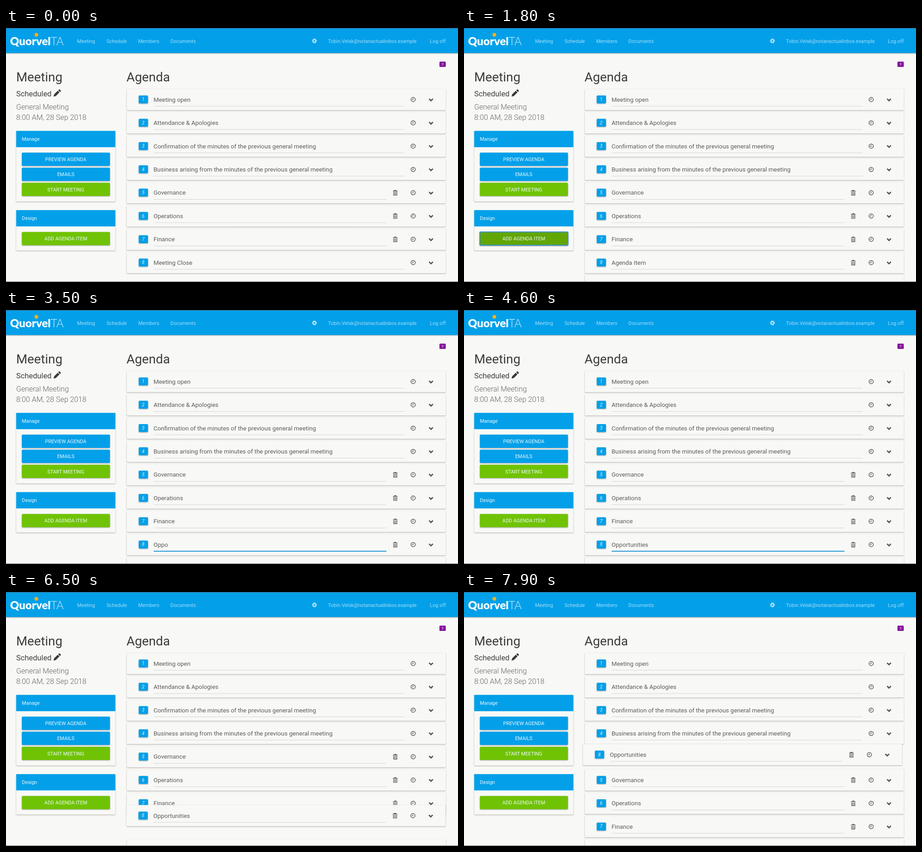
These frames come from a looping animation (998x561 px, 8000 ms). An HTML page:

```html
<!DOCTYPE html>
<html lang="en">
<head>
<meta charset="utf-8">
<title>Meeting agenda</title>
<style>
  html, body { margin: 0; width: 100%; height: 100%; overflow: hidden; background: #f8f9f6; }
  svg { display: block; width: 100%; height: 100%; font-family: Roboto, "Open Sans", sans-serif; }
  text { white-space: pre; }
  .nav { font-size: 11px; fill: #a5dcf6; }
  .logo { font-family: Lato, sans-serif; font-size: 24.5px; font-weight: 900; fill: #fff; }
  .thin { font-weight: 300; fill: #d8f1fc; }
  .title { font-size: 28.2px; fill: #3c3c3c; }
  .state { font-size: 16.8px; fill: #3f3f3f; }
  .meta { font-size: 16.3px; font-weight: 300; fill: #666; }
  .label { font-size: 10.9px; fill: #edf8fd; }
  .mid { text-anchor: middle; }
  .item { font-size: 13.45px; fill: #5c5c5c; }
  .num { font-size: 10px; font-style: italic; fill: #e4f5fd; text-anchor: middle; }
  .card { fill: #f8f9f6; filter: drop-shadow(0 1px 1px rgba(70, 50, 50, .42)); }
  .raised { filter: drop-shadow(0 1px 1px rgba(0, 0, 0, .38)); }
  .blue { fill: #03a0e9; }
  .green { fill: #70c304; }
  .line { stroke: #d3d4d2; stroke-width: 1; }
  .focus .line { stroke: #1f93d6; stroke-width: 2; }
  .icon { fill: #555; }
  .stroke { fill: none; stroke: #555; }
</style>
</head>
<body>
<svg id="stage" viewBox="0 0 998 561">
  <rect width="998" height="561" fill="#f8f9f6"/>
  <g id="rows"></g>
  <rect class="blue raised" width="998" height="55.3"/>
  <rect width="998" height="1.2" fill="#3f6c80"/>
  <rect y="559.8" width="998" height="1.2" fill="#707270"/>
  <circle cx="67" cy="15" r="4.2" fill="#f4b01c"/>
  <text class="logo" x="9" y="38">Quorvel<tspan class="thin">TA</tspan></text>
  <g class="nav">
    <text x="157" y="33">Meeting</text>
    <text x="222" y="33">Schedule</text>
    <text x="292" y="33">Members</text>
    <text x="363" y="33">Documents</text>
    <text x="711" y="33">Tobin.Velsk@notanactualinbox.example</text>
    <text x="936" y="33">Log off</text>
  </g>
  <g transform="translate(681 28.5)" fill="none" stroke="#b5e3f8">
    <circle r="3" stroke-width="2.4"/>
    <circle r="4.7" stroke-width="1.6" stroke-dasharray="1.85 1.84"/>
  </g>
  <rect x="957" y="74.3" width="14" height="11.7" rx="1.5" fill="#84189c"/>
  <text x="964" y="83" font-size="8" font-weight="700" fill="#ead5ef" class="mid">?</text>
  <text class="title" x="22.5" y="118.3">Meeting</text>
  <text class="title" x="266" y="118.3">Agenda</text>
  <text class="state" x="22.5" y="150.7">Scheduled</text>
  <path d="M105 151.500l1.300-5 8-8 3.700 3.700-8 8zM115.300 137.500l1.600-1.600q1-.8 2 0l1.900 1.900q.8 1 0 2l-1.600 1.600z" fill="#3a3a3a"/>
  <text class="meta" x="22.5" y="180">General Meeting</text>
  <text class="meta" x="22.5" y="202.500">8:00 AM, 28 Sep 2018</text>
  <g id="panels"></g>
</svg>
<script>
const LOOP = 8000, STEP = 100, PITCH = 51.45, FIRST = 158;
const HOVER = 600, ADD = 1500, LEAVE = 2000, FOCUS = 2900, TYPE = 3200, KEY = 90, BLUR = 5100;
const NEW_NAME = "Opportunities";
const $ = id => document.getElementById(id);

function add(parent, tag, attrs, text) {
  const node = document.createElementNS("http://www.w3.org/2000/svg", tag);
  for (const key in attrs) node.setAttribute(key, attrs[key]);
  if (text !== undefined) node.textContent = text;
  return parent.appendChild(node);
}

function box(parent, cls, x, y, width, height, rx = 0) {
  return add(parent, "rect", { class: cls, x, y, width, height, rx });
}

function panel(y, height, title) {
  box($("panels"), "card", 22.5, y, 219, height, 1);
  box($("panels"), "blue", 22.5, y, 219, 36, 1);
  add($("panels"), "text", { class: "label", x: 35, y: y + 22 }, title);
}

function button(y, cls, title) {
  const rect = box($("panels"), cls + " raised", 35, y, 194.5, 29.3, 2);
  add($("panels"), "text", { class: "label mid", x: 132, y: y + 18.7 }, title);
  return rect;
}

// Row parts are placed around the row's vertical centre.
function makeRow(name, removable) {
  const g = add($("rows"), "g", {});
  box(g, "card", 266.5, -23.5, 704.5, 47, 1);
  box(g, "blue raised", 293, -9, 20.500, 17.500, 2);
  const num = add(g, "text", { class: "num", x: 303, y: 3.3 });
  const label = add(g, "text", { class: "item", x: 325.7, y: 4.6 }, name);
  add(g, "line", { class: "line", x1: 326, x2: removable ? 840 : 880, y1: 14.700, y2: 14.700 });
  if (removable) {
    add(g, "path", { class: "icon", d: "M854.500-4.500h3v-1.500h4v1.500h3v1.400h-10z" });
    add(g, "path", { class: "stroke", d: "M855.800-2.500v8h7.400v-8M858.200-2v6.500M860.800-2v6.500", "stroke-width": 1.2 });
  }
  add(g, "circle", { class: "stroke", cx: 899, cy: 0, r: 4.700, "stroke-width": 1.5 });
  add(g, "path", { class: "stroke", d: "M899-3v3.500h-2.600", "stroke-width": 1.1 });
  add(g, "path", { class: "stroke", d: "M934.200-1.600l4.200 4.100 4.200-4.100", "stroke-width": 2.8 });
  return { g, num, label };
}

panel(227.2, 156, "Manage");
button(275.2, "blue", "PREVIEW AGENDA");
button(308.4, "blue", "EMAILS");
button(341.8, "green", "START MEETING");
panel(402.3, 89.200, "Design");
const addButton = button(450.5, "green", "ADD AGENDA ITEM");

const rows = [
  ["Meeting open"],
  ["Attendance & Apologies"],
  ["Confirmation of the minutes of the previous general meeting"],
  ["Business arising from the minutes of the previous general meeting"],
  ["Governance", true],
  ["Operations", true],
  ["Finance", true],
  ["Meeting Close"]
].map(spec => makeRow(...spec));
const fresh = makeRow("Agenda Item", true);
const closing = rows[7];

// Dragged row: time, centre y, sideways shift
const drag = [
  [6300, 518, 0], [6600, 482, -0.800], [7000, 398.3, -1.6], [7400, 374, -2.8], [7900, 359.3, -4]
];

function dragAt(t) {
  if (t <= drag[0][0]) return { y: FIRST + 7 * PITCH, x: 0 };
  const i = Math.max(1, drag.findIndex(p => p[0] >= t));
  const a = drag[i - 1], b = drag[i], k = (t - a[0]) / (b[0] - a[0]);
  return { y: a[1] + (b[1] - a[1]) * k, x: a[2] + (b[2] - a[2]) * k };
}

const place = (row, x, y) => row.g.setAttribute("transform", `translate(${x} ${y})`);

function draw(t) {
  const added = t >= ADD;
  const pos = dragAt(t);
  const gap = added ? Math.round((pos.y - FIRST) / PITCH) : rows.length;
  rows.forEach((row, i) => {
    place(row, 0, FIRST + (i + (i >= gap)) * PITCH);
    row.num.textContent = i + 1;
  });
  closing.num.textContent = added ? 9 : 8;

  fresh.g.style.display = added ? "" : "none";
  fresh.num.textContent = 8;
  place(fresh, pos.x, pos.y);
  fresh.g.classList.toggle("focus", t >= FOCUS && t < BLUR);
  const typed = Math.floor((t - TYPE) / KEY) + 1;
  fresh.label.textContent = typed > 0 ? NEW_NAME.slice(0, typed) : "Agenda Item";

  const focused = added && t < FOCUS;
  addButton.style.fill = t >= HOVER && t < LEAVE ? "#62a603" : "";
  addButton.style.stroke = focused ? "#3b8ed0" : "none";
  addButton.style.strokeWidth = 2;
}

const start = performance.now();
function tick() {
  const t = (performance.now() - start) % LOOP;
  draw(Math.floor(t / STEP) * STEP);
  requestAnimationFrame(tick);
}
tick();
</script>
</body>
</html>
```
